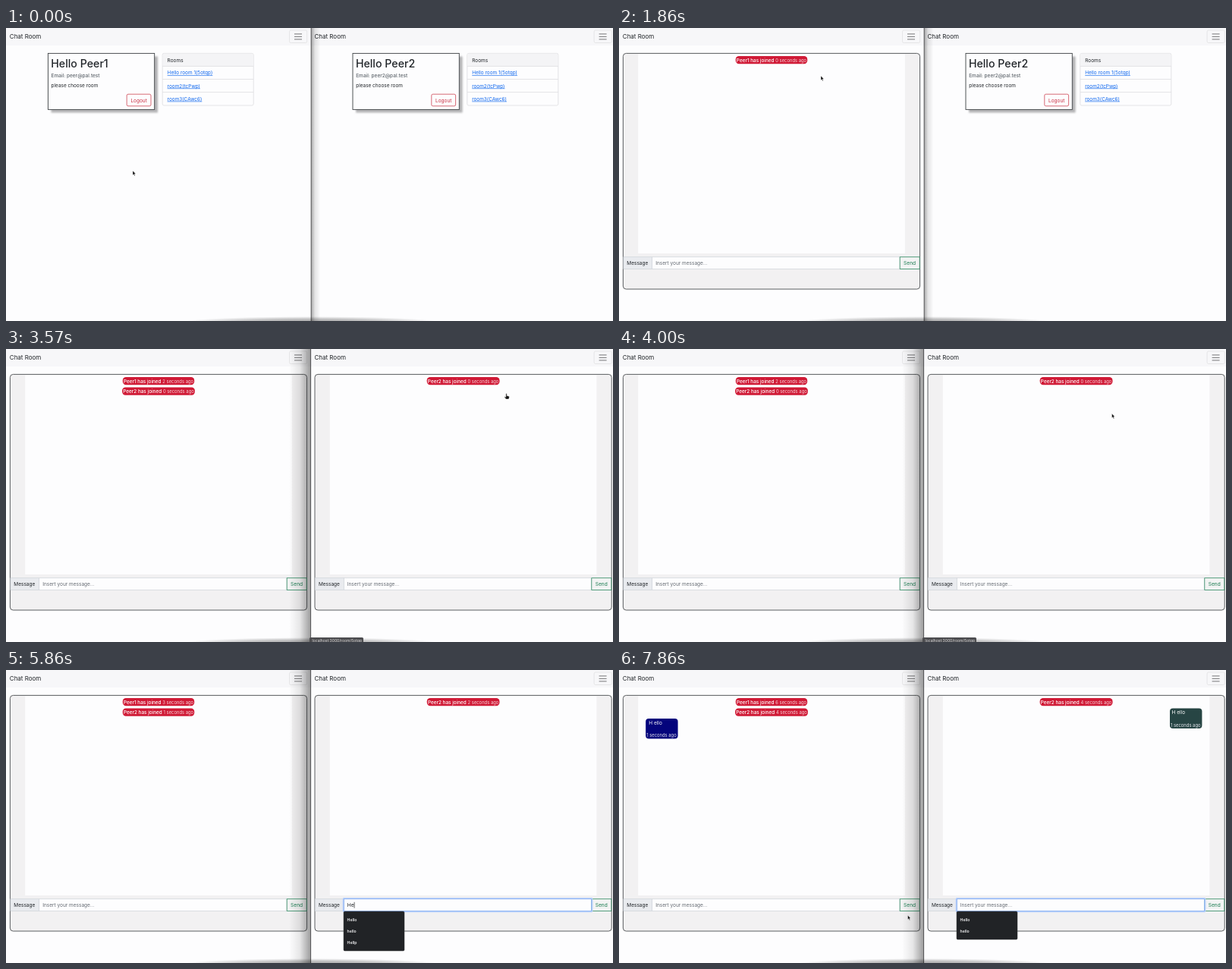
These frames come from a looping animation (800 px wide and 386 px high, 8000 ms). An HTML page:

```html
<!DOCTYPE html>
<html lang="en">
<head>
<meta charset="utf-8">
<title>Chat Room</title>
<style>
  html, body { margin: 0; width: 100%; height: 100%; overflow: hidden; background: #fdfdfe; }
  svg { display: block; width: 100vw; height: 100vh; }
  text { font-family: Inter, Roboto, sans-serif; white-space: pre; }
</style>
</head>
<body>
<svg id="stage" viewBox="0 0 800 386" xmlns="http://www.w3.org/2000/svg">
  <defs>
    <filter id="soft" x="-10%" y="-10%" width="120%" height="120%"><feGaussianBlur stdDeviation="0.9"/></filter>
    <linearGradient id="toLeft">
      <stop offset="0" stop-color="#000" stop-opacity="0"/>
      <stop offset=".5" stop-color="#000" stop-opacity=".09"/>
      <stop offset="1" stop-color="#000" stop-opacity=".38"/>
    </linearGradient>
    <linearGradient id="toRight">
      <stop offset="0" stop-color="#000" stop-opacity=".32"/>
      <stop offset=".4" stop-color="#000" stop-opacity=".1"/>
      <stop offset="1" stop-color="#000" stop-opacity="0"/>
    </linearGradient>
    <radialGradient id="dock">
      <stop offset="0" stop-color="#000" stop-opacity=".4"/>
      <stop offset=".6" stop-color="#000" stop-opacity=".22"/>
      <stop offset="1" stop-color="#000" stop-opacity="0"/>
    </radialGradient>
  </defs>
  <g id="scene"></g>
</svg>
<script>
const LOOP = 8000, RATE = 7;      // the screen refreshes seven times a second
const PANE = 401.6;               // distance between the two windows
const INK = '#212529', SIZE = 6.5, SMALL = 5.85;
const scene = document.getElementById('scene');
const pen = document.createElement('canvas').getContext('2d');

// Event times, counted in refreshes
const JOIN_1 = 9, FOCUS_RIGHT = 19, JOIN_2 = 24, OPEN_LIST = 34, TYPE = 39, SEND = 46;
const LEFT_TICKS = [JOIN_1, JOIN_2, 31, SEND, 53];
const RIGHT_TICKS = [JOIN_2, 31, 38, SEND, 53];
const TYPED = [[TYPE, 'H'], [41, 'He'], [42, 'Hel'], [43, 'Hell'], [44, 'Hello'], [SEND, '']];
const ROOMS = ['Hello room 1(5otqp)', 'room2(tcPwp)', 'room3(CAwc6)'];

// Pointer path: time, x, y
const PATH = [
  [1, 167, 188], [6, 236, 64], [7, 241, 58], [10, 242, 58], [13, 266, 63],
  [14, 330, 66], [16, 580, 72], [18, 668, 66], [20, 659.5, 58.5], [25, 659.5, 58.5],
  [28, 649.5, 85], [31, 622, 230], [33, 605, 311], [47, 605, 311],
  [49, 560, 322], [52, 420, 327], [54, 380.5, 323]
];

function textWidth(str, size, weight = 400) {
  pen.font = `${weight} 100px Inter, Roboto, sans-serif`;
  return pen.measureText(str).width * size / 100;
}

const rect = (x, y, w, h, fill, more = '') =>
  `<rect x="${x}" y="${y}" width="${w}" height="${h}" fill="${fill}" ${more}/>`;
const line = (x1, y1, x2, y2, color, w = 1) =>
  `<path d="M${x1} ${y1}L${x2} ${y2}" stroke="${color}" stroke-width="${w}"/>`;
const text = (x, y, str, size = SIZE, fill = INK, more = '') =>
  `<text x="${x}" y="${y}" font-size="${size}" fill="${fill}" ${more}>${str}</text>`;
const shift = (x, body) => `<g transform="translate(${x} 0)">${body}</g>`;
const border = (color, w = 1) => `stroke="${color}" stroke-width="${w}"`;

function header() {
  let s = rect(0, 0, 402, 23, '#f7f7f9') + text(4.8, 14.2, 'Chat Room', 8);
  s += rect(373.5, 3, 23.2, 16.5, 'none', 'rx="1.8" ' + border('#e1e1e3', .8));
  for (const y of [7.9, 11.4, 14.9]) s += line(380, y, 390, y, '#68686a', .9);
  return s;
}

function lobby(name, mail) {
  let s = rect(59.5, 37.5, 140.5, 74, '#b4b4b6', 'filter="url(#soft)"');
  s += rect(55.4, 33.4, 140.3, 74, '#fdfdfe', border('#3c4043', .9));
  s += text(59.3, 52, 'Hello ' + name, 14.2, INK, 'font-weight="500"');
  s += text(59.6, 65.3, 'Email: ' + mail, SIZE, '#5f666c', 'font-weight="500"');
  s += text(59.6, 78, 'please choose room', 6.45);
  s += rect(159.2, 87.2, 31.8, 15.6, '#fdfdfe', 'rx="1.8" ' + border('#cf4655', .8));
  s += text(175.1, 97.5, 'Logout', SIZE, '#cb2f42', 'text-anchor="middle"');
  s += rect(206.2, 33.4, 120, 68.6, '#fdfdfe', 'rx="2" ' + border('#dedee0', .8));
  s += rect(206.6, 33.8, 119.2, 16.4, '#f4f4f6', 'rx="1.6"');
  s += text(212.6, 44.5, 'Rooms');
  ROOMS.forEach((room, i) => {
    const y = 50.4 + 17.1 * i;
    s += line(206.2, y, 326.2, y, '#dedee0', .8);
    s += text(212.6, y + 11, room, 6.45, '#0d66ee', 'text-decoration="underline"');
  });
  return s;
}

const ago = n => n + ' seconds ago';

function badge(row, name, secs) {
  const head = name + ' has joined ', tail = ago(secs);
  const headW = textWidth(head, 6.4, 500), w = headW + textWidth(tail, SMALL) + 2.2;
  const x = 201 - w / 2, y = 37 + 13.4 * row;
  return rect(x, y, w, 10.3, '#d01a36', 'rx="4.2"') +
    text(x + 1.1, y + 7.5, head, 6.4, '#fff', 'font-weight="500"') +
    text(x + 1.1 + headW, y + 7.5, tail, SMALL, '#f6d4da');
}

function bubble(x, y, pad, fill, secs) {
  return rect(x, y, 42.4, 26.6, fill, 'rx="4"') +
    text(x + pad, y + 7.6, 'H ello', SIZE, '#fff') +
    text(x + 1, y + 24.3, ago(secs), SMALL, '#e3e5ec');
}

function chat(posts, typed, ring) {
  let s = rect(5.4, 33.4, 391.2, 310.6, '#f2f1f2', 'rx="4" ' + border('#4b4e51', .9));
  s += rect(25.2, 34.6, 351.6, 262.4, '#fdfdfe') + posts;
  s += rect(5.9, 301.7, 38, 15.8, '#e9ebef', border('#cfd3d9', .7));
  s += rect(43.7, 301.7, 326.4, 15.8, '#fdfdfe', border('#cfd3d9', .7));
  s += rect(370.2, 301.7, 26, 15.8, '#f2f3f3', border('#2f8a62', .8));
  s += text(10.3, 312, 'Message') + text(383.1, 312, 'Send', 6.6, '#1c7d52', 'text-anchor="middle"');
  if (ring) {
    s += rect(42.9, 300.9, 328, 17.4, 'none', 'rx="1" ' + border('#b9d0fa', 1.8));
    s += rect(43.7, 301.7, 326.4, 15.8, 'none', border('#86b0f5', .8));
  }
  return s + (typed ? text(48.2, 312, typed, 6.7)
                    : text(48.2, 312, 'Insert your message...', SIZE, '#666c73'));
}

function suggestions(top, items) {
  return rect(445, top, 80, 7 + 15 * items.length, '#212326', 'rx="1.6" ' + border('#3a3c3f', .5)) +
    items.map((item, i) =>
      text(449.6, top + 12.8 + 15 * i, item, 5.2, '#f3f3f4', 'font-weight="600"')).join('');
}

const status = x => rect(x - 2, 380, 71, 8, '#4d4d50', 'rx="1.5"') +
  text(x + 1.6, 385.6, 'localhost:3000/room/5otqp', 5.05, '#d6d6d8');

function pointerAt(k) {
  const i = PATH.findIndex(p => p[0] > k);
  if (i === 0) return PATH[0].slice(1);
  if (i < 0) return PATH[PATH.length - 1].slice(1);
  const [t0, x0, y0] = PATH[i - 1], [t1, x1, y1] = PATH[i];
  const f = (k - t0) / (t1 - t0);
  return [x0 + (x1 - x0) * f, y0 + (y1 - y0) * f];
}

function pointer(k) {
  if (k >= TYPE && k < 47) return '';
  const [x, y] = pointerAt(k);
  const beam = k >= 33 && k < 49;
  const hand = (k >= 7 && k < 11) || (k > 20 && k < 26);
  let shape;
  if (beam) {
    shape = '<path d="M-1.5 -3.6Q0 -3.6 0 -2.8Q0 -3.6 1.5 -3.6M0 -2.8V2.8M-1.5 3.6Q0 3.6 0 2.8Q0 3.6 1.5 3.6M-.8 1.4H.8" fill="none" stroke="#222" stroke-width=".8"/>';
  } else if (hand) {
    shape = '<path d="M-.7 .6Q0 -.4 .7 .6V3L3.4 3.7Q4 4 3.8 5L3.2 7.6H-.6L-2.5 5Q-2.6 4 -1.6 4.2L-.7 5Z" fill="#111" stroke="#fff" stroke-width=".5"/>';
  } else {
    shape = '<path d="M0 0V5.8L1.3 4.7L2.2 6.8L3.2 6.4L2.3 4.3H4Z" fill="#0c0c0c" stroke="#fff" stroke-width=".45"/>';
  }
  return `<g transform="translate(${x} ${y})">${shape}</g>`;
}

function draw(k) {
  const since = (birth, ticks) =>
    Math.floor((Math.max(...ticks.filter(t => t <= k)) - birth) / RATE);
  const sent = k >= SEND, joined = k >= JOIN_2;
  const typed = TYPED.reduce((now, [t, str]) => t <= k ? str : now, '');

  let left = lobby('Peer1', 'peer@pal.test');
  if (k >= JOIN_1) {
    let posts = badge(0, 'Peer1', since(JOIN_1, LEFT_TICKS));
    if (joined) posts += badge(1, 'Peer2', since(JOIN_2, LEFT_TICKS));
    if (sent) posts += bubble(35.2, 63.9, 4.1, '#04047c', since(SEND, LEFT_TICKS));
    left = chat(posts, '', false);
  }

  let right = lobby('Peer2', 'peer2@pal.test');
  if (joined) {
    let posts = badge(0, 'Peer2', since(JOIN_2, RIGHT_TICKS));
    if (sent) posts += bubble(324.4, 50.4, 2.6, '#274544', since(SEND, RIGHT_TICKS));
    right = chat(posts, typed, k > OPEN_LIST);
  }

  let s = rect(0, 0, 800, 386, '#fdfdfe');
  s += shift(0, header() + left) + shift(PANE, header() + right);

  if (k < FOCUS_RIGHT) {
    s += rect(402.4, 0, 12, 386, 'url(#toRight)') + line(402.2, 0, 402.2, 386, '#4a4a4c', 1);
  } else {
    s += rect(373, 0, 28.4, 386, 'url(#toLeft)') + line(401.6, 0, 401.6, 386, '#3f3f41', .9);
  }
  s += '<ellipse cx="402" cy="388" rx="172" ry="8" fill="url(#dock)"/>';

  if (k >= 6 && k < 13) s += status(0);
  if (k >= 21 && k < 29) s += status(402);

  if (k >= OPEN_LIST) {
    if (k < TYPE) s += suggestions(204, ['a', 'Hello', 'asd', 'asdasd', 'aaaa', 'asdas']);
    else s += suggestions(318, ['Hello', 'hello', 'Hellp'].slice(0, k < 44 ? 3 : 2));
    const blinkFrom = k < TYPE ? OPEN_LIST : k < 44 ? k : 44;
    if ((k - blinkFrom) % 7 < 3.5) {
      const x = 450.2 + (typed ? textWidth(typed, 6.7) : 0);
      s += line(x, 305.8, x, 313.6, '#222', .7);
    }
  }
  scene.innerHTML = s + pointer(k);
}

let shown = -1;
function tick() {
  const k = Math.floor((performance.now() % LOOP) * RATE / 1000);
  if (k !== shown) draw(shown = k);
  requestAnimationFrame(tick);
}
tick();
</script>
</body>
</html>
```
